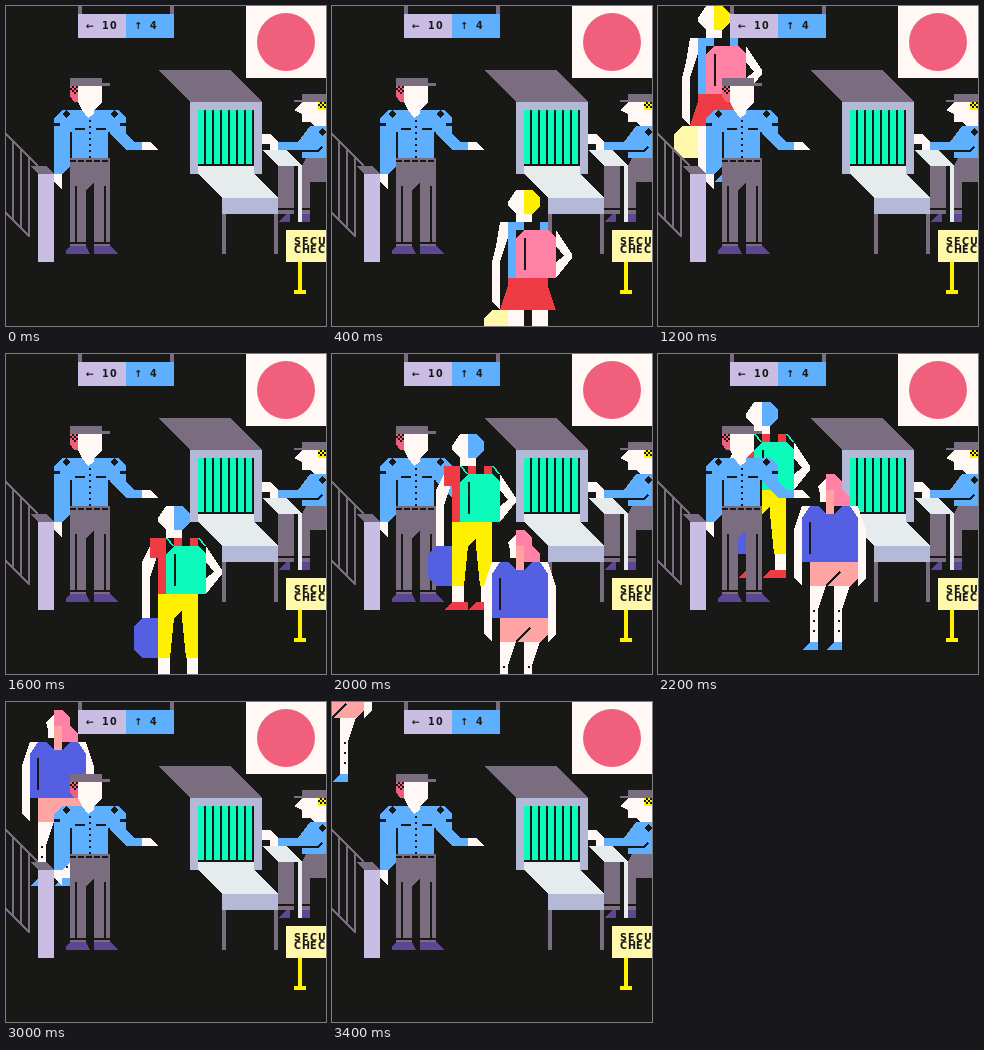
An HTML page for the animation above (3.6 s loop, 320 by 320 pixels).

```html
<!DOCTYPE html>
<html lang="en">
<head>
<meta charset="utf-8">
<title>Security check</title>
<style>
html, body { margin: 0; width: 100%; height: 100%; overflow: hidden; background: #181817; }
svg { display: block; width: 100vw; height: 100vh; }
text { font: bold 9.6px "DejaVu Sans", sans-serif; white-space: pre; fill: #181817; }
.ink { fill: #181817; }
.line { fill: none; stroke: #181817; stroke-width: 2; }
.rail { fill: #181817; stroke: #7a6d80; stroke-width: 2; }
.grey { fill: #7a6d80; }
.mist { fill: #b4b9d8; }
.pale { fill: #e6ebee; }
.lilac { fill: #cabde3; }
.blue { fill: #5eb0ff; }
.indigo { fill: #555fe2; }
.violet { fill: #5d4790; }
.skin { fill: #fff8f4; }
.rose { fill: #f0607c; }
.pink { fill: #ff82a6; }
.peach { fill: #ffa3a3; }
.red { fill: #ef3b44; }
.mint { fill: #0cfabb; }
.sun { fill: #fff000; }
.cream { fill: #fff8aa; }
</style>
</head>
<body>
<svg viewBox="0 0 320 320" shape-rendering="crispEdges">
  <rect class="ink" width="320" height="320"/>

  <g id="machine">
    <path class="grey" d="M152 64h72l32 32h-72zM216 208h4v40h-4zM268 208h4v40h-4z"/>
    <path class="mist" d="M184 96h72v72h-8v-64h-56v64h-8zM216 192h56v16h-56z"/>
    <g id="curtain"></g>
    <path class="pale" d="M192 160h56v8l24 24h-56l-24-24z"/>
  </g>

  <g id="clerk">
    <path class="grey" d="M272 160h16v48h-16zM300 152h20v24h-16v32h-8v-48z"/>
    <path class="line" d="M272 203h16M296 203h8"/>
    <path class="violet" d="M280 208h4v8h-12zM296 208h8v8h-10z"/>
    <path class="pale" d="M256 144h24l16 16h-24z"/>
    <path class="pale" d="M292 160h4v56h-4z"/>
    <path class="blue" d="M304 120h16v32h-24v-8h-24v-8h20z"/>
    <path class="line" d="M296 145h16l4-4"/>
    <path class="ink" d="M316 122l4 4-4 4-4-4z"/>
    <path class="skin" d="M256 128h8l8 8v8h-8v-6h-8zM296 96h16v8h8v16h-12l-4-4h-8v-8l-8-4z"/>
    <path class="grey" d="M296 88h24v8h-32v-2h8z"/>
    <path class="sun" d="M312 96h8v8h-8z"/>
    <path class="ink" d="M314 96h2v2h-2zM318 96h2v2h-2zM312 98h2v2h-2zM316 98h2v2h-2zM314 100h2v2h-2zM318 100h2v2h-2z"/>
  </g>

  <g id="back"></g>

  <g id="guard">
    <path class="grey" d="M64 152h40v88h-16v-64l-8 8v56h-16z"/>
    <path class="violet" d="M64 240h16l4 8h-24v-4zM88 240h16l8 8h-24z"/>
    <path class="line" d="M70 180v56M99 180v56M64 237h16M88 237h16"/>
    <path class="blue" d="M56 104h56l8 8v16l8 8h8v8h-16l-16-16v24h-40v-32v40l-8 8h-8v-56z"/>
    <path class="ink" d="M60 104l4 4-4 4-4-4zM108 104l4 4-4 4-4-4zM48 117h6v3h-6zM114 117h6v3h-6z"/>
    <path class="line" d="M65 126v26M103 126v26M69 123h10M90 123h10"/>
    <path class="line" stroke-dasharray="2 4" d="M84 114v38"/>
    <path class="line" stroke-dasharray="6 2" d="M64 155h40"/>
    <path class="skin" d="M72 80h24v16l-8 8v4l-6 4-6-8-4-8zM48 168h8v16l-8-8zM136 136h8l8 8h-16z"/>
    <path class="rose" d="M64 80h8v16h-4l-4-6z"/>
    <path class="ink" d="M66 80h2v2h-2zM70 80h2v2h-2zM64 82h2v2h-2zM68 82h2v2h-2zM66 84h2v2h-2zM70 84h2v2h-2zM68 86h2v2h-2z"/>
    <path class="grey" d="M64 72h32v5h8v3h-40z"/>
  </g>

  <g id="barrier">
    <path class="ink" d="M0 128l24 24v79l-24-24z"/>
    <path class="rail" d="M0 128l32 32M0 207l24 24M7 135v79M15 143v79M23 151v79"/>
    <path class="grey" d="M24 160h16l8 8h-16z"/>
    <path class="lilac" d="M32 168h16v88h-16z"/>
  </g>

  <g id="front"></g>

  <g id="signs">
    <path class="grey" d="M72 0h4v8h-4zM164 0h4v8h-4z"/>
    <path class="lilac" d="M72 8h48v24h-48z"/>
    <path class="blue" d="M120 8h48v24h-48z"/>
    <text y="23" x="80 88 96 104">← 10</text>
    <text y="23" x="128 136 144">↑ 4</text>
    <path class="skin" d="M240 0h80v72h-80z"/>
    <circle class="rose" cx="280" cy="36" r="29" shape-rendering="auto"/>
    <path class="sun" d="M292 256h4v28h4v4h-12v-4h4z"/>
    <path class="cream" d="M280 224h40v32h-40z"/>
    <text y="239" x="288 296 304 312 320 328 336 344">SECURITY</text>
    <text y="247" x="288 296 304 312 320">CHECK</text>
  </g>

  <g id="ann">
    <path class="cream" d="M8 120h16v32h-16l-8-8v-16z"/>
    <path class="skin" d="M24 120h16v48h-16zM48 120h16v48h-16z"/>
    <path class="blue" d="M24 168h16v8h-24zM48 168h16v8h-24z"/>
    <path class="red" d="M24 88h40v8l8 24h-56l8-24z"/>
    <path class="skin" d="M16 32h8v16l-8 24v48l-8-8v-40l4-16z"/>
    <path class="blue" d="M24 32h8v56h-8zM32 32h8v8h-8zM56 32h8v8h-8z"/>
    <path class="skin" d="M72 40l16 24v4l-16 20v-16l8-6-8-10z"/>
    <path class="pink" d="M40 40h24l8 8v40h-40v-40z"/>
    <path class="line" d="M41 48v32"/>
    <path class="skin" d="M32 0h8v24h8v8h-16v-8l-8-8v-4z"/>
    <path class="sun" d="M40 0h8l8 8v8l-8 8h-8z"/>
  </g>

  <g id="ben">
    <path class="indigo" d="M8 112h16v40h-16l-8-8v-24z"/>
    <path class="skin" d="M24 152h12v16h-12zM53 152h11v16h-11z"/>
    <path class="red" d="M24 168h16v8h-24zM48 168h16v8h-24z"/>
    <path class="sun" d="M24 88h40v64h-12l-4-40v-8l-8 8-4 40h-12z"/>
    <path class="skin" d="M16 40h8v8l-8 24v40h-8v-56z"/>
    <path class="red" d="M16 32h16v56h-8v-36h-8zM40 32h8v8h-8zM56 32h8v8h-8z"/>
    <path class="skin" d="M72 40l16 24v4l-16 20v-16l8-6-8-10z"/>
    <path class="mint" d="M40 40h24l8 8v40h-40v-40zM32 32h2l6 8h-2zM64 32h2l6 8h-2z"/>
    <path class="line" d="M41 48v32"/>
    <path class="skin" d="M32 0h8v24h8v8h-16v-8l-8-8v-4z"/>
    <path class="blue" d="M40 0h8l8 8v8l-8 8h-8z"/>
  </g>

  <g id="cat">
    <path class="skin" d="M16 112h16l-8 24v32h-8zM40 112h16l-8 24v32h-8z"/>
    <path class="blue" d="M16 168h8v8h-16zM40 168h8v8h-16z"/>
    <path class="ink" d="M19 136h2v2h-2zM19 146h2v2h-2zM19 156h2v2h-2zM44 136h2v2h-2zM44 146h2v2h-2zM44 156h2v2h-2z"/>
    <path class="peach" d="M16 88h48v16l-8 8h-40z"/>
    <path class="line" d="M32 112l14-14"/>
    <path class="skin" d="M8 32h8l-8 16v64l-8-8v-48zM56 32h8l8 24v48l-8 8v-64z"/>
    <path class="indigo" d="M16 32h8l8 8h8l8-8h8l8 12v44h-56v-44z"/>
    <path class="line" d="M16 48v32"/>
    <path class="skin" d="M32 4v24h-6v-8l-2-8z"/>
    <path class="pink" d="M32 0h8l8 8v8l8 8v8h-24z"/>
    <path class="peach" d="M32 16h8v24h-8z"/>
  </g>
</svg>
<script>
const STEP = 200, LOOP = 3600, GUARD_Y = 72;
const byId = id => document.getElementById(id);

// Each walker enters at a step and takes one stride per step.
const walkers = [
  { id: 'ann', enter: 1, path: [[176, 256], [152, 184], [136, 128], [112, 72], [80, 40], [16, 0], [-40, -32]] },
  { id: 'ben', enter: 7, path: [[168, 208], [128, 152], [120, 104], [96, 80], [64, 48], [24, 16], [-32, -8], [-72, -40]] },
  { id: 'cat', enter: 9, path: [[184, 232], [152, 176], [136, 120], [104, 96], [80, 72], [48, 40], [16, 8], [-24, -48], [-32, -96]] }
];

byId('curtain').innerHTML = Array.from({ length: 7 }, (_, i) =>
  `<rect class="mint" x="${192 + i * 8}" y="104" width="6" height="54"/>`).join('');

function draw(ms) {
  const step = Math.floor((ms % LOOP) / STEP);
  for (const { id, enter, path } of walkers) {
    const el = byId(id), spot = path[step - enter];
    el.style.display = spot ? '' : 'none';
    if (!spot) continue;
    const layer = byId(spot[1] < GUARD_Y ? 'back' : 'front');
    if (el.parentNode !== layer) layer.append(el);
    el.setAttribute('transform', `translate(${spot})`);
  }
}

const start = performance.now();
function tick(now) {
  draw(Math.max(0, now - start));
  requestAnimationFrame(tick);
}
draw(0);
requestAnimationFrame(tick);
</script>
</body>
</html>
```
